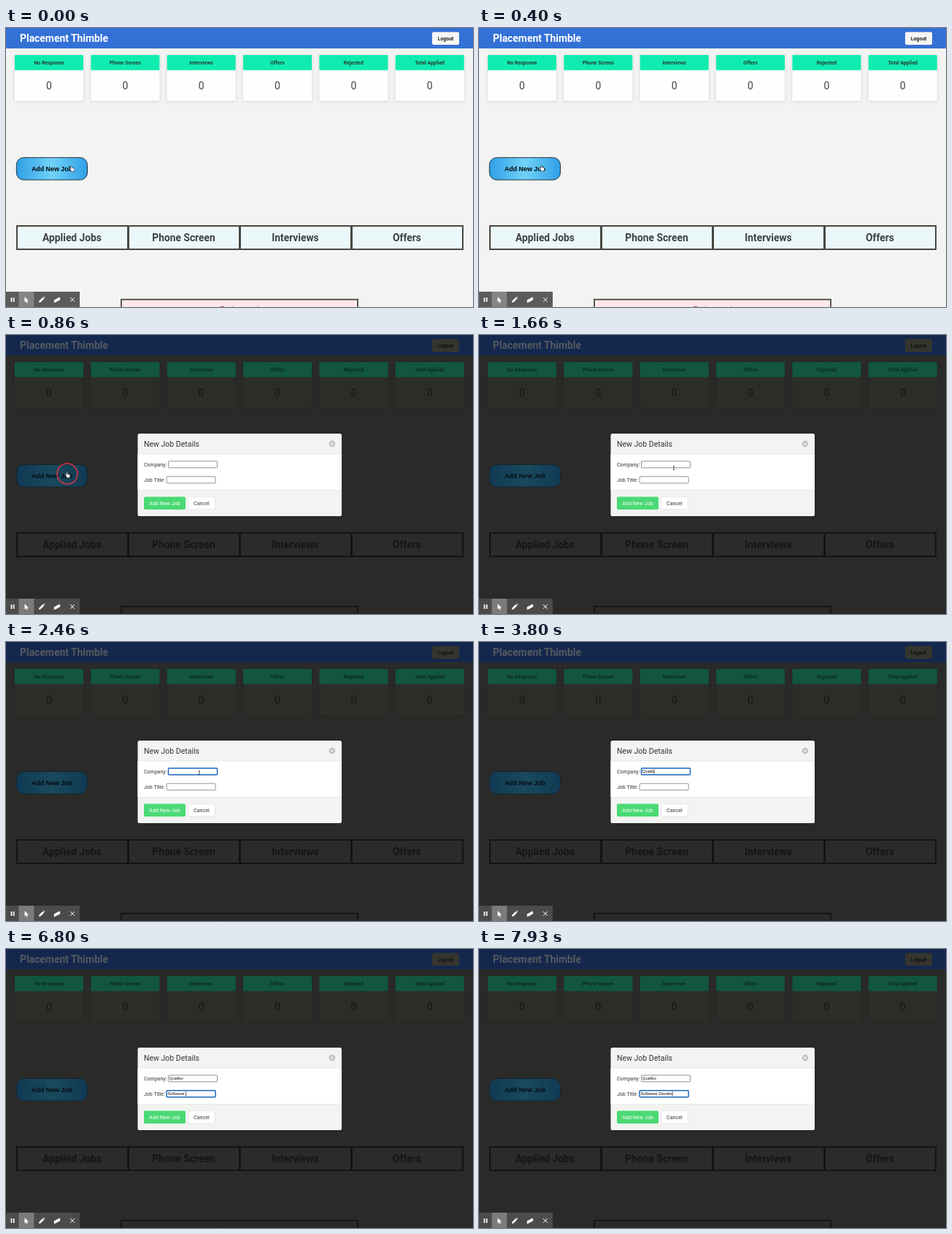
Animation, 640 px wide and 382 px high, one loop 8000 ms. Source, as an HTML page:

```html
<!DOCTYPE html>
<html lang="en">
<head>
<meta charset="utf-8">
<title>Job tracker</title>
<style>
  html, body { margin: 0; width: 100%; height: 100%; overflow: hidden; }
  svg { display: block; width: 100vw; height: 100vh; font-family: Roboto, Arial, sans-serif; }
  .mid { text-anchor: middle; }
  .bold { font-weight: 700; }
  .plain { font-family: "Liberation Sans", Arial, sans-serif; }
  .card { filter: drop-shadow(0 1.5px 2px rgba(10, 10, 10, .13)); }
  .field { font-size: 5.9px; fill: #111; white-space: pre; }
</style>
</head>
<body>
<svg id="stage" viewBox="0 0 640 382" xmlns="http://www.w3.org/2000/svg">
  <defs>
    <linearGradient id="shine">
      <stop offset="0" style="stop-color:var(--btnEdge)"/>
      <stop offset=".5" style="stop-color:var(--btnMid)"/>
      <stop offset="1" style="stop-color:var(--btnEdge)"/>
    </linearGradient>
  </defs>
  <g id="page"></g>
  <g id="modal"></g>
  <g id="toolbar"></g>
  <g id="pointer">
    <path id="arrow" d="M0 0V9L2.1 7.1 3.5 10.2 5 9.5 3.6 6.6H6.4Z" fill="#111" stroke="#fff" stroke-width=".7"/>
    <path id="hand" d="M-1.4-2.6Q-.5-3.6.2-2.4L.6-.5 3-.1Q4.2.3 3.9 1.6L3.2 4.6H-.4L-3-.1Q-2.8-.9-1.9-.3L-1 .5Z"
      fill="#fff" stroke="#222" stroke-width=".6"/>
    <path id="beam" d="M-1-2.7Q0-2.7 0-2Q0-2.7 1-2.7M0-2V2M-1 2.7Q0 2.7 0 2Q0 2.7 1 2.7" fill="none" stroke="#222" stroke-width=".8"/>
  </g>
  <circle id="ring" r="14" fill="none" stroke="#dc3545" stroke-width="1.5"/>
</svg>
<script>
const LOOP = 8000;
const $ = id => document.getElementById(id);
const stage = $('stage');

const light = {
  body: '#f3f3f1', head: '#3471d6', title: '#ffffff', logout: '#f6f6f5', logoutText: '#222',
  green: '#10ecb0', label: '#263d36', card: '#fefefd', zero: '#444', border: '#474842',
  cell: '#ebf8f9', cellText: '#3d4042', pink: '#fde7ec', pinkText: '#c5485a',
  btnEdge: '#2f9fe6', btnMid: '#70d2f8', btnText: '#06090c', bar: '#5b5b59', barOn: '#858583'
};
const dim = {
  body: '#2a2b28', head: '#14284d', title: '#555960', logout: '#35352f', logoutText: '#10110f',
  green: '#12563f', label: '#0b2c22', card: '#2c2d29', zero: '#151614', border: '#131412',
  cell: '#2a2c2b', cellText: '#141514', pink: '#2b2a29', pinkText: '#24191a',
  btnEdge: '#113a55', btnMid: '#194a5d', btnText: '#070d12', bar: '#4b4b49', barOn: '#7b7b79'
};
const muted = {
  ...dim, body: '#2b2b2d', head: '#28272c', title: '#49494c', logout: '#39383a', green: '#14503f',
  card: '#2c2c2e', cell: '#2c2c2e', btnEdge: '#153b3c', btnMid: '#174241'
};

const rect = (x, y, w, h, fill, more = '') =>
  `<rect x="${x}" y="${y}" width="${w}" height="${h}" fill="${fill}" ${more}/>`;
const text = (x, y, size, fill, label, cls = '') =>
  `<text x="${x}" y="${y}" font-size="${size}" fill="${fill}" class="${cls}">${label}</text>`;

function pageMarkup() {
  const cards = ['No Response', 'Phone Screen', 'Interviews', 'Offers', 'Rejected', 'Total Applied'];
  const stages = ['Applied Jobs', 'Phone Screen', 'Interviews', 'Offers'];
  return rect(0, 0, 640, 382, 'var(--body)') +
    rect(0, 0, 640, 28, 'var(--head)') +
    text(19, 19, 13.9, 'var(--title)', 'Placement Thimble', 'bold') +
    rect(584, 5.5, 37, 17.5, 'var(--logout)', 'rx="2"') +
    text(602.5, 16.6, 6.9, 'var(--logoutText)', 'Logout', 'mid bold') +
    cards.map((name, i) => {
      const x = 12 + 104.35 * i;
      return `<g class="card">${rect(x, 37, 94, 62.8, 'var(--card)', 'rx="1"')}</g>` +
        rect(x, 37, 94, 20.8, 'var(--green)', 'rx="1"') +
        text(x + 47, 49.6, 6.9, 'var(--label)', name, 'mid bold') +
        text(x + 47, 83.8, 14, 'var(--zero)', '0', 'mid');
    }).join('') +
    rect(14.3, 177.4, 97.2, 30.6, 'url(#shine)', 'rx="10" stroke="#16222c" stroke-width=".9"') +
    text(63, 196, 8.9, 'var(--btnText)', 'Add New Job', 'mid bold plain') +
    stages.map((name, i) => {
      const x = 14 + 153 * i;
      return rect(x + 1, 271, 152, 32, 'var(--cell)', 'stroke="var(--border)" stroke-width="2"') +
        text(x + 76.5, 292, 13.8, 'var(--cellText)', name, 'mid bold');
    }).join('') +
    rect(158, 371.7, 324, 30, 'var(--pink)', 'stroke="var(--border)" stroke-width="1.8"') +
    text(320, 391.7, 14, 'var(--pinkText)', 'Rejected', 'mid');
}

function fieldMarkup(id, label, x, y) {
  return text(189, y + 7.2, 7, '#333', label) +
    rect(x + .5, y + .5, 67, 9, '#fff', `id="${id}Box" rx="1"`) +
    `<text id="${id}Text" x="${x + 1.8}" y="${y + 7.1}" class="field plain" xml:space="preserve"></text>` +
    rect(x + 2, y + 1.7, .7, 6.6, '#111', `id="${id}Caret"`);
}

function modalMarkup() {
  return rect(180.5, 135, 279.5, 113, '#f3f4f2', 'rx="2.6"') +
    rect(180.5, 163, 279.5, 49.3, '#fff') +
    rect(180.5, 162.7, 279.5, .5, '#d8d8d8') + rect(180.5, 212, 279.5, .5, '#d8d8d8') +
    text(189, 152.6, 10.5, '#333', 'New Job Details') +
    '<circle cx="447" cy="149" r="4.4" fill="#c3c4c2"/>' +
    '<path d="M445.4 147.4l3.2 3.2m0-3.2l-3.2 3.2" stroke="#fff" stroke-width=".9"/>' +
    fieldMarkup('company', 'Company:', 222, 172.3) +
    fieldMarkup('job', 'Job Title:', 219.6, 193.3) +
    rect(189, 221.5, 57, 17.5, '#4bd975', 'rx="1.8"') +
    text(217.5, 232.8, 7.15, '#fff', 'Add New Job', 'mid') +
    rect(249.7, 221.8, 36.4, 17, '#fff', 'rx="1.8" stroke="#d8d8d8" stroke-width=".5"') +
    text(267.9, 232.8, 7.1, '#333', 'Cancel', 'mid');
}

function toolbarMarkup() {
  return rect(0, 361, 101, 21, 'var(--bar)') + rect(17.5, 361, 20.8, 21, 'var(--barOn)') +
    '<g fill="#fff"><path d="M6.6 369h1.7v6H6.6zM9.8 369h1.7v6H9.8z"/>' +
    '<path d="M25.5 368V375.6L27.3 374 28.6 376.7 29.8 376.1 28.5 373.5H31Z"/>' +
    '<path d="M45 376L45.5 373.6 50.4 368.7 52.3 370.6 47.4 375.5ZM51 368.1L51.8 367.5 53.4 369.2 52.8 370Z"/>' +
    '<path d="M65.8 376.2V372.6L73.6 368.2 74.4 372 68.6 375.2Z"/></g>' +
    '<path d="M88 369l5.8 5.8m0-5.8l-5.8 5.8" stroke="#fff" stroke-width="1"/>';
}

$('page').innerHTML = pageMarkup();
$('modal').innerHTML = modalMarkup();
$('toolbar').innerHTML = toolbarMarkup();

const show = (id, on) => $(id).setAttribute('visibility', on ? 'visible' : 'hidden');
const between = (t, a, b) => t >= a && t < b;

// Pointer stops: time, x, y
const path = [[0, 90, 192], [60, 90, 192], [600, 84, 191], [860, 84, 191], [1660, 267, 182], [1900, 265, 179]];
function pointerAt(t) {
  const i = path.findIndex(p => p[0] > t);
  if (i < 0) return path[path.length - 1].slice(1);
  const [a, b] = [path[i - 1], path[i]];
  const u = (t - a[0]) / (b[0] - a[0]);
  const k = u * u * (3 - 2 * u);
  return [a[1] + (b[1] - a[1]) * k, a[2] + (b[2] - a[2]) * k];
}

const companyKeys = [2800, 3200, 3400, 3600, 3800, 4260];
const jobKeys = Array.from({ length: 15 }, (_, i) => i < 9 ? 6000 + 90 * i : 7000 + 160 * (i - 9));

function drawField(id, t, value, keys, focusFrom, focusTo) {
  const typed = keys.filter(k => k <= t);
  const focused = between(t, focusFrom, focusTo);
  const label = $(id + 'Text');
  const box = $(id + 'Box');
  const caret = $(id + 'Caret');
  label.textContent = value.slice(0, typed.length);
  box.setAttribute('stroke', focused ? '#1c66bd' : '#777');
  box.setAttribute('stroke-width', focused ? 1.5 : .8);
  const lastKey = typed.length ? typed[typed.length - 1] : focusFrom;
  const lit = focused && (t - lastKey) % 1000 < 500;
  caret.setAttribute('x', +label.getAttribute('x') + (typed.length ? label.getComputedTextLength() : 0) + .1);
  caret.setAttribute('opacity', lit ? 1 : 0);
}

let palette;
function setPalette(next) {
  if (next === palette) return;
  palette = next;
  for (const key in next) stage.style.setProperty('--' + key, next[key]);
}

function render(t) {
  const open = t >= 860;
  setPalette(!open ? light : between(t, 5000, 5660) ? muted : dim);
  $('modal').style.display = open ? '' : 'none';

  const [x, y] = pointerAt(t);
  const overInput = t > 930 && between(x, 222, 290) && between(y, 172, 183);
  $('pointer').setAttribute('transform', `translate(${x} ${y})`);
  const visible = t < 2800;
  show('hand', t < 930);
  show('beam', visible && overInput);
  show('arrow', visible && t >= 930 && !overInput);
  show('ring', between(t, 720, 1000) || between(t, 1900, 2330));
  $('ring').setAttribute('transform', `translate(${x} ${y - 1})`);

  drawField('company', t, 'Quelbo', companyKeys, 1940, 4400);
  drawField('job', t, 'Software Develo', jobKeys, 4400, LOOP);
}

const start = performance.now();
function tick() {
  render((performance.now() - start) % LOOP);
  requestAnimationFrame(tick);
}
tick();
</script>
</body>
</html>
```
